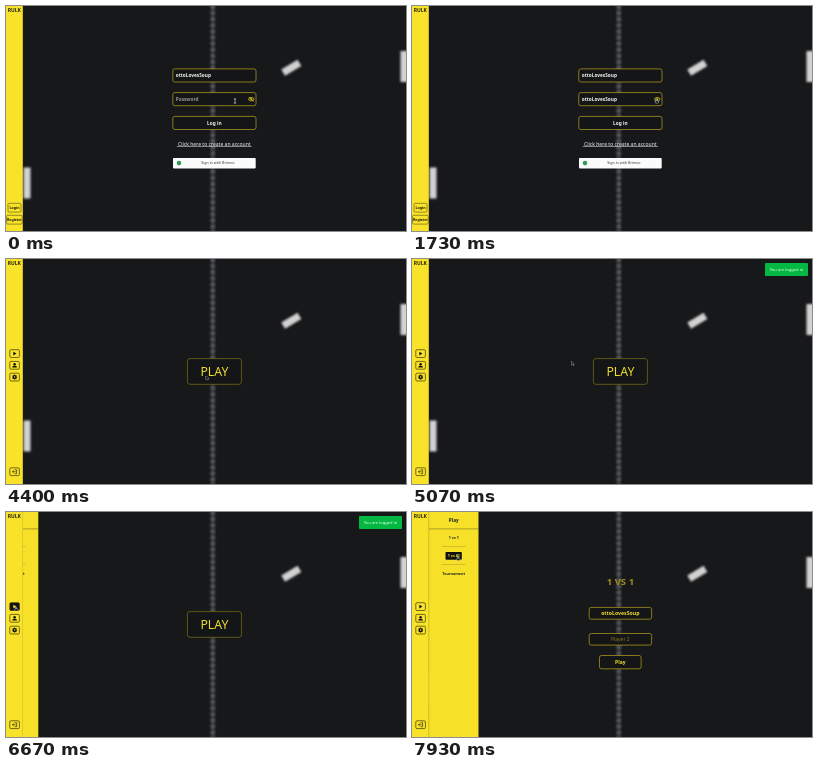
Write an HTML page with a canvas that moves like this. It is 400 px wide and 225 px high and loops after 8 s.

```html
<!DOCTYPE html>
<html lang="en">
<head>
<meta charset="utf-8">
<title>Paddle game login</title>
<style>
  html, body { margin: 0; width: 100%; height: 100%; overflow: hidden; background: #17181a; }
  canvas { display: block; width: 100vw; height: 100vh; }
</style>
</head>
<body>
<canvas id="stage"></canvas>
<script>
const W = 400, H = 225, LOOP = 8000;
const YELLOW = '#f9e32a', GOLD = '#a5941f', INK = '#17181a', WHITE = '#f4f4f4';
const FONT = '"Noto Sans", "Open Sans", sans-serif';
const USER = 'ottoLovesSoup';

const T = {
  typeFrom: 180, typeTo: 1180, show: 1620, hide: 2130,
  login: 4400, toastEnd: 6820, menu: 6600, hoverPlay: [6460, 7040],
  game: 7420, hoverAi: 7780
};

// time, x, y: the pointer rests between equal points
const PATH = [
  [0, 229, 95], [1200, 229, 95], [1540, 244.5, 93], [3690, 244.5, 93],
  [4080, 200, 117], [4480, 200, 117], [4950, 159.5, 102.5], [5560, 159.5, 102.5],
  [6200, 4.5, 85.5], [6290, 4.5, 85.5], [6500, 10, 95], [6950, 10, 95],
  [7260, 42, 27], [7500, 42, 27], [7820, 46, 44.5], [8000, 46, 44.5]
];

const canvas = document.getElementById('stage');
const back = document.createElement('canvas');
let ctx = canvas.getContext('2d');

const clamp = v => Math.max(0, Math.min(1, v));
const ease = v => v * v * (3 - 2 * v);
const ramp = (t, from, to) => ease(clamp((t - from) / (to - from)));
const within = (t, [from, to]) => t >= from && t < to;

function rect(x, y, w, h, color) {
  ctx.fillStyle = color;
  ctx.fillRect(x, y, w, h);
}

function round(x, y, w, h, r, { fill, stroke, line = 0.7 } = {}) {
  ctx.beginPath();
  ctx.roundRect(x, y, w, h, r);
  if (fill) { ctx.fillStyle = fill; ctx.fill(); }
  if (stroke) { ctx.strokeStyle = stroke; ctx.lineWidth = line; ctx.stroke(); }
}

function dot(x, y, r, color) {
  ctx.beginPath();
  ctx.arc(x, y, r, 0, Math.PI * 2);
  ctx.fillStyle = color;
  ctx.fill();
}

function text(str, x, y, size, color, weight = 400, align = 'center') {
  ctx.font = `${weight} ${size}px ${FONT}`;
  ctx.textAlign = align;
  ctx.textBaseline = 'alphabetic';
  ctx.fillStyle = color;
  ctx.fillText(str, x, y);
}

function poly(points, { fill, stroke, line = 0.6, open = false } = {}) {
  ctx.beginPath();
  points.forEach(([x, y], i) => i ? ctx.lineTo(x, y) : ctx.moveTo(x, y));
  if (!open) ctx.closePath();
  if (stroke) { ctx.strokeStyle = stroke; ctx.lineWidth = line; ctx.stroke(); }
  if (fill) { ctx.fillStyle = fill; ctx.fill(); }
}

function at(x, y, draw) {
  ctx.save();
  ctx.translate(x, y);
  draw();
  ctx.restore();
}

function paintBackground(scale) {
  const main = ctx;
  ctx = back.getContext('2d');
  ctx.setTransform(scale, 0, 0, scale, 0, 0);
  rect(0, 0, W, H, INK);
  ctx.filter = `blur(${0.8 * scale}px)`;
  for (let y = 1; y < H + 4; y += 6.1) {
    ctx.beginPath();
    ctx.ellipse(206.8, y, 2.4, 2.9, 0, 0, Math.PI * 2);
    ctx.fillStyle = '#55585a';
    ctx.fill();
  }
  ctx.filter = `blur(${1.1 * scale}px)`;
  rect(17.5, 161.5, 7, 31, '#d2d2d2');
  rect(394.5, 45, 8, 31, '#d2d2d2');
  at(285.3, 61.8, () => {
    ctx.rotate(-0.54);
    rect(-9.5, -3.7, 19, 7.4, '#d2d2d2');
  });
  ctx.filter = 'none';
  ctx = main;
}

function sideButton(y, active, icon) {
  round(3.8, y - 3.9, 9.6, 7.8, 1.2, { fill: active ? '#111' : null, stroke: '#3b360c' });
  at(8.6, y, () => icon(active ? YELLOW : '#111'));
}

const icons = {
  play: c => poly([[-1.3, -1.9], [1.9, 0], [-1.3, 1.9]], { fill: c }),
  person(c) {
    dot(0, -1.1, 1.2, c);
    round(-2.3, 0.4, 4.6, 1.9, [1.6, 1.6, 0, 0], { fill: c });
  },
  gear(c) {
    for (let i = 0; i < 4; i++) {
      ctx.rotate(Math.PI / 4);
      rect(-0.5, -2.5, 1, 5, c);
    }
    dot(0, 0, 1.9, c);
    dot(0, 0, 0.75, YELLOW);
  },
  exit(c) {
    poly([[0, -2], [2, -2], [2, 2], [0, 2]], { stroke: c, open: true });
    poly([[1, 0], [-2.2, 0], [-0.9, -1.2]], { stroke: c, open: true });
    poly([[-2.2, 0], [-0.9, 1.2]], { stroke: c, open: true });
  }
};

function sidebar(t) {
  rect(0, 0, 16.8, H, YELLOW);
  text('RULK', 8.3, 5.7, 5, '#2b270a', 800);
  if (t < T.login) {
    [['Login', 2, 197.3, 13], ['Register', 0.6, 209.3, 15.6]].forEach(([label, x, y, w]) => {
      round(x, y, w, 8.8, 1.2, { stroke: '#574e10', line: 0.6 });
      text(label, x + w / 2, y + 5.7, 3.6, '#17150a', 700);
    });
    return;
  }
  sideButton(94.6, within(t, T.hoverPlay), icons.play);
  sideButton(106.3, false, icons.person);
  sideButton(118.1, false, icons.gear);
  sideButton(212.7, false, icons.exit);
}

function menu(t) {
  const open = ramp(t, T.menu, T.menu + 190);
  if (!open) return;
  ctx.save();
  ctx.beginPath();
  ctx.rect(16.5, 0, 50.2, H);
  ctx.clip();
  ctx.translate(-50.2 * (1 - open), 0);
  rect(16.5, 0, 50.2, H, '#f6e128');
  rect(16.5, 0, 0.6, H, '#8b7d1c');
  rect(16.5, 16.6, 50.2, 0.7, '#8b7d1c');
  text('Play', 41.8, 10.2, 4.7, '#222', 700);
  const hover = t >= T.hoverAi;
  const first = t >= 7230 && t < 7550;
  if (first) round(34, 22, 16, 7.5, 0.8, { fill: '#111' });
  text('1 vs 1', 41.8, 27.3, 3.7, first ? YELLOW : '#222', 700);
  if (hover) round(33.5, 40, 16.3, 7.7, 0.8, { fill: '#111' });
  text('1 vs AI', 41.7, 45.2, 3.7, hover ? YELLOW : '#222', 700);
  text('Tournament', 41.7, 63, 3.7, '#222', 700);
  rect(30, 34.5, 23.5, 0.5, '#aa9b20');
  rect(30, 52.2, 23.5, 0.5, '#aa9b20');
  ctx.restore();
}

function field(x, y, w, h) {
  round(x, y, w, h, 2, { fill: '#141516', stroke: GOLD, line: 0.8 });
}

function eye(open) {
  at(245.3, 93.2, () => {
    ctx.strokeStyle = '#e0c91e';
    ctx.lineWidth = 0.8;
    ctx.beginPath();
    ctx.ellipse(0, 0, 2.7, 1.7, 0, 0, Math.PI * 2);
    ctx.stroke();
    dot(0, 0, 0.9, '#e0c91e');
    if (!open) poly([[-2.3, -2.3], [2.3, 2.3]], { stroke: '#e0c91e', line: 0.8, open: true });
  });
}

function loginPage(t) {
  field(166.8, 62.9, 83.2, 13.1);
  field(166.8, 86.6, 83.2, 13.1);
  field(166.8, 110.4, 83.2, 13.1);
  text(USER, 169.8, 71.3, 4.75, WHITE, 600, 'left');

  const shown = t >= T.show && t < T.hide;
  const typed = Math.floor(clamp((t - T.typeFrom) / (T.typeTo - T.typeFrom)) * USER.length);
  if (!typed) text('Password', 169.8, 95, 4.75, '#96978f', 600, 'left');
  else if (shown) text(USER, 169.8, 95, 4.75, WHITE, 600, 'left');
  else for (let i = 0; i < typed; i++) dot(170.7 + i * 1.8, 93.3, 0.72, WHITE);
  eye(shown);

  text('Log in', 208.3, 118.9, 4.8, WHITE, 700);
  text('Click here to create an account', 208.3, 139.5, 5.05, WHITE);
  rect(170.8, 140.3, 75, 0.5, WHITE);
  round(167, 152, 82.7, 10.4, 0.8, { fill: '#fbfbfb' });
  dot(173, 157.1, 2.3, '#2f9d58');
  text('Sign in with Brimvo', 211.8, 158.4, 3.65, '#33363a', 500);
}

function playPage() {
  round(181.4, 99.6, 54, 25.7, 2.5, { fill: '#141516', stroke: '#716719', line: 0.8 });
  text('PLAY', 208.4, 117, 12.3, '#efdc2d');
}

function gamePage() {
  text('1 VS 1', 208.4, 72.5, 9.6, '#a08e20', 600);
  field(177.2, 95.4, 62.4, 11.8);
  field(177.2, 121.5, 62.4, 11.6);
  field(187.5, 143.5, 41.6, 13.3);
  text(USER, 208.3, 103.1, 5.2, '#f0dc2c', 700);
  text('Player 2', 208.3, 129, 5, '#8b7d22', 500);
  text('Play', 208.3, 151.9, 5, '#f0dc2c', 700);
}

function toast(t) {
  const show = ramp(t, T.login + 60, T.login + 260) * (1 - ramp(t, T.toastEnd - 120, T.toastEnd));
  if (!show) return;
  ctx.globalAlpha = show;
  round(353, 4, 43, 13, 1, { fill: '#04b942' });
  text('You are logged in', 374.5, 11.9, 4.1, '#e4ffe9');
  ctx.globalAlpha = 1;
}

function pointerAt(t) {
  const i = PATH.findIndex(p => p[0] > t);
  const [t0, x0, y0] = PATH[i - 1], [t1, x1, y1] = PATH[i];
  const k = ramp(t, t0, t1);
  return [x0 + (x1 - x0) * k, y0 + (y1 - y0) * k];
}

function beam() {
  rect(-0.35, -2.2, 0.7, 4.4, '#ddd');
  rect(-1.1, -2.4, 2.2, 0.6, '#ddd');
  rect(-1.1, 1.8, 2.2, 0.6, '#ddd');
}

function hand() {
  const edge = { fill: '#161616', stroke: '#d8d8d8', line: 0.5 };
  round(-0.5, -0.2, 1, 3, 0.5, edge);
  round(-1.2, 1.6, 3.2, 2.5, 0.8, edge);
}

function arrow() {
  poly([[0, 0], [0, 3.5], [0.9, 2.7], [1.5, 4], [2.1, 3.7], [1.5, 2.5], [2.6, 2.4]],
    { fill: '#111', stroke: '#d0d0d0', line: 0.7 });
}

function pointer(t) {
  const [x, y] = pointerAt(t);
  const overEye = x > 241 && y < 97;
  const overLogin = t > 3690 && t < T.login && y > 110;
  const overMenu = t > 6430 && (x < 14 || (x > 33 && x < 51));
  const shape = overEye || overLogin || overMenu ? hand : t < 1540 ? beam : arrow;
  at(x, y, shape);
}

function draw(t) {
  ctx.drawImage(back, 0, 0, W, H);
  if (t < T.login) loginPage(t);
  else if (t < T.game) playPage();
  else gamePage();
  toast(t);
  menu(t);
  sidebar(t);
  pointer(t);
}

function resize() {
  const scale = innerWidth / W * (devicePixelRatio || 1);
  for (const c of [canvas, back]) {
    c.width = Math.round(W * scale);
    c.height = Math.round(H * scale);
  }
  ctx.setTransform(scale, 0, 0, scale, 0, 0);
  paintBackground(scale);
}

const start = performance.now();
function tick() {
  draw((performance.now() - start) % LOOP);
  requestAnimationFrame(tick);
}

addEventListener('resize', resize);
resize();
tick();
</script>
</body>
</html>
```
